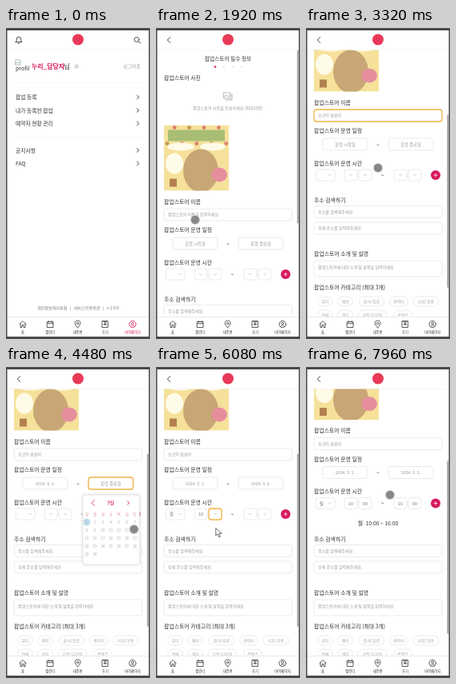
Recreate the animation shown at these times as an HTML page with a canvas. Size 180 by 389 pixels, loop 8 s.

```html
<!DOCTYPE html>
<html lang="ko">
<head>
<meta charset="utf-8">
<title>팝업 등록</title>
<style>
  html, body { margin: 0; width: 100%; height: 100%; overflow: hidden; background: #fff; }
  canvas { display: block; width: 180px; height: 389px; }
</style>
</head>
<body>
<canvas id="stage"></canvas>
<script>
const W = 180, H = 389, LOOP = 8000;
const INK = '#333', GREY = '#999', LINE = '#dedede', PINK = '#d81b60', GOLD = '#efb243';
const canvas = document.getElementById('stage');
const ctx = canvas.getContext('2d');
const ratio = window.devicePixelRatio || 1;
canvas.width = W * ratio;
canvas.height = H * ratio;

const OPEN_FORM = 860, ADD_PHOTO = 1500, SCROLL_START = 2800, SCROLL_END = 3240, ADD_TIME = 7720;
const NAME = '포근이 솜솜이';

// Which field has the focus, and from when to when.
const focusSpans = [
  ['name', 2040, 3600], ['startDate', 3600, 4000], ['endDate', 4240, 4680],
  ['day', 4920, 5080], ['startHour', 5200, 5840], ['startMinute', 5840, 6480],
  ['endHour', 6640, 7120], ['endMinute', 7120, 7560]
];

// time, x, y of the pointer
const path = [
  [80, 80, 150], [500, 34, 88], [860, 34, 88], [1120, 90, 86], [1400, 90, 86],
  [1920, 49, 240], [2600, 49, 240], [3320, 90, 175], [3560, 50, 146], [3700, 50, 146],
  [3960, 34, 192], [4200, 130, 146], [4300, 130, 146], [4480, 160, 203], [4640, 141, 194],
  [4900, 24, 184], [5060, 24, 184], [5280, 54, 190], [5700, 58, 232], [5900, 74, 186],
  [6320, 76, 226], [6640, 118, 184], [6880, 122, 234], [7100, 122, 234], [7280, 137, 185],
  [7480, 140, 220], [7660, 162, 184], [7760, 162, 184], [7960, 105, 160]
];

const clamp = v => Math.max(0, Math.min(1, v));
const ease = v => v * v * (3 - 2 * v);
const progress = (t, a, b) => ease(clamp((t - a) / (b - a)));

function text(str, x, y, size = 5.1, color = GREY, align = 'left', weight = 400) {
  ctx.font = `${weight} ${size}px "Noto Sans CJK KR", "Noto Sans CJK", sans-serif`;
  ctx.fillStyle = color;
  ctx.textAlign = align;
  ctx.textBaseline = 'middle';
  ctx.fillText(str, x, y);
}
const centered = (str, x, y, size, color, weight) => text(str, x, y, size, color, 'center', weight);
const label = (str, y) => text(str, 10, y, 6.9, INK, 'left', 500);

function rect(x, y, w, h, color) {
  ctx.fillStyle = color;
  ctx.fillRect(x, y, w, h);
}
function ellipse(x, y, rx, ry, color) {
  ctx.beginPath();
  ctx.ellipse(x, y, rx, ry, 0, 0, Math.PI * 2);
  ctx.fillStyle = color;
  ctx.fill();
}
const disc = (x, y, r, color) => ellipse(x, y, r, r, color);

function box(x, y, w, h, focused = false, radius = 3) {
  ctx.beginPath();
  ctx.roundRect(x, y, w, h, radius);
  ctx.fillStyle = '#fff';
  ctx.fill();
  ctx.lineWidth = focused ? 1.3 : 0.6;
  ctx.strokeStyle = focused ? GOLD : LINE;
  ctx.stroke();
}
function icon(x, y, d, color = INK, width = 0.9) {
  ctx.save();
  ctx.translate(x, y);
  ctx.lineWidth = width;
  ctx.lineCap = ctx.lineJoin = 'round';
  ctx.strokeStyle = color;
  ctx.stroke(new Path2D(d));
  ctx.restore();
}

const ICONS = {
  bell: 'M-4 2.5H4L2.8 1V-1A2.8 2.8 0 0 0-2.8-1V1ZM-1 4.3H1',
  search: 'M2.4-.5A3 3 0 1 1-3.6-.5A3 3 0 1 1 2.4-.5M1.6 1.7L4 4.2',
  back: 'M1.7-3.5L-1.7 0L1.7 3.5',
  next: 'M-1.2-2.2L1.2 0L-1.2 2.2',
  down: 'M-1.4-.7L0 .7L1.4-.7',
  gear: 'M2.4 0A2.4 2.4 0 1 1-2.4 0A2.4 2.4 0 1 1 2.4 0M.8 0A.8.8 0 1 1-.8 0A.8.8 0 1 1 .8 0',
  photo: 'M-5-4H3V3H-5ZM5-2V5H-3M-5 1L-2-1L0 1L3-1',
  home: 'M-4 0L0-4L4 0M-3-1V4H-1V1H1V4H3V-1',
  calendar: 'M-3.7-3H3.7V4H-3.7ZM-3.7-.8H3.7M-2-4.2V-2.5M2-4.2V-2.5',
  pin: 'M0 4.5C-6-2-3-4.5 0-4.5S6-2 0 4.5M1.2-1A1.2 1.2 0 1 1-1.2-1A1.2 1.2 0 1 1 1.2-1',
  review: 'M-3.5-4H3.5V4H-3.5ZM0-2V1.5M-1.7 0H1.7M-1.5-4V-2.5H1.5V-4',
  person: 'M4.2 0A4.2 4.2 0 1 1-4.2 0A4.2 4.2 0 1 1 4.2 0M1.4-1A1.4 1.4 0 1 1-1.4-1A1.4 1.4 0 1 1 1.4-1M-2.7 3C-1.5 1 1.5 1 2.7 3'
};

function drawHeader(isForm) {
  rect(0, 0, W, 27, '#fff');
  rect(0, 27, W, 0.5, '#eee');
  icon(16, 15, isForm ? ICONS.back : ICONS.bell);
  if (!isForm) icon(164, 15, ICONS.search);
  disc(90, 14.5, 7, '#e83a58');
}

function drawNav(isForm) {
  const tabs = [['home', '홈'], ['calendar', '캘린더'], ['pin', '내주변'], ['review', '후기'], ['person', '마이페이지']];
  rect(0, 361, W, 28, '#fff');
  rect(0, 361, W, 0.6, '#ddd');
  tabs.forEach(([name, title], i) => {
    const x = 21 + i * 34.3;
    const color = !isForm && i === 4 ? PINK : INK;
    icon(x, 370.5, ICONS[name], color, 0.8);
    centered(title, x, 380, 4.3, color);
  });
}

function drawMenu() {
  icon(15, 43, 'M-3-3H2L3-2V3H-3ZM-3 2L-1 0L1 1L3-1', '#8a9', 0.7);
  ctx.save();
  ctx.beginPath();
  ctx.rect(11, 38, 18, 18);
  ctx.clip();
  text('profile', 12, 50, 7, INK);
  ctx.restore();
  text('누리_담당자', 32, 48, 8, PINK, 'left', 700);
  text('님', 72.5, 48, 8, INK);
  icon(88, 48, ICONS.gear, '#aaa', 0.6);
  text('로그아웃', 168, 48, 5.8, GREY, 'right');
  rect(10, 68, 160, 0.5, '#eee');
  rect(10, 136, 160, 0.5, '#eee');
  [['팝업 등록', 86.5], ['내가 등록한 팝업', 103], ['예약자 현황 관리', 119.5], ['공지사항', 153], ['FAQ', 169.5]]
    .forEach(([title, y]) => {
      text(title, 12, y, 6.8, INK);
      icon(165, y, ICONS.next);
    });
  centered('개인정보처리방침   |   서비스이용약관   |   v.1.0.0', 90, 350, 5.1, '#777');
}

function drawPoster(x, y) {
  ctx.save();
  ctx.translate(x, y);
  ctx.beginPath();
  ctx.rect(0, 0, 81, 82);
  ctx.clip();
  rect(0, 0, 81, 82, '#f5e19a');
  rect(5, 6, 71, 14, '#a9bd75');
  for (let i = 0; i < 9; i++) disc(4 + i * 9.2, i % 2 ? 3 : 23, 2.4, i % 3 ? '#dd8271' : '#c99a4e');
  ellipse(21, 27, 17, 5, '#fffbe9');
  ellipse(61, 27, 16, 5, '#fffbe9');
  ellipse(13, 48, 11, 13, '#fffbe9');
  ellipse(46, 57, 22, 27, '#c8a675');
  ellipse(69, 62, 10, 9, '#e58f9d');
  rect(7, 67, 9, 10, '#b38150');
  ctx.restore();
}

function drawCalendar(x, y, selected) {
  ctx.save();
  ctx.shadowColor = '#0002';
  ctx.shadowBlur = 4 * ratio;
  box(x, y, 71, 87);
  ctx.restore();
  icon(x + 13, y + 10, ICONS.back, PINK, 0.8);
  centered('9월', x + 35, y + 10, 6.2, PINK, 500);
  icon(x + 57, y + 10, ICONS.next, PINK, 0.8);
  [...'일월화수목금토'].forEach((day, i) => centered(day, x + 5 + i * 10, y + 24, 4.5, '#d98aa3'));
  if (selected) disc(x + 5 + (selected - 1) * 10, y + 34, 4.5, '#bcdcec');
  for (let d = 0; d < 30; d++)
    centered(d + 1, x + 5 + d % 7 * 10, y + 34 + Math.floor(d / 7) * 10, 4.5, '#aaa');
}

function drawTimeRow(t, y, focus) {
  const select = (name, x, w, value) => {
    box(x, y - 7, w, 14, focus === name);
    if (value) centered(value, x + w / 2, y, 5.3, '#777');
    else icon(x + w / 2, y, ICONS.down, '#aaa', 0.6);
  };
  box(12, y - 7, 24, 14, focus === 'day');
  if (t >= 5080) text('월', 17, y, 5.3, '#777');
  icon(30, y, ICONS.down, '#aaa', 0.6);
  select('startHour', 48, 16, t >= 5840 && '10');
  select('startMinute', 66, 16, t >= 6480 && '00');
  centered('~', 95.5, y, 7, INK);
  select('endHour', 110, 16, t >= 7120 && '16');
  select('endMinute', 128, 16, t >= 7560 && '00');
  [65, 127].forEach(x => centered(':', x, y, 5, '#777'));
  disc(162, y, 6, PINK);
  icon(162, y, 'M-1.8 0H1.8M0-1.8V1.8', '#fff', 0.8);
}

function drawForm(t) {
  const focus = (focusSpans.find(([, from, to]) => t >= from && t < to) || [])[0];
  const added = t >= ADD_TIME ? 13.5 : 0;
  const scroll = 124 * progress(t, SCROLL_START, SCROLL_END) + added;

  ctx.save();
  ctx.translate(0, -scroll);
  centered('팝업스토어 필수 정보', 90, 38, 6.7, INK, 500);
  [74, 85, 96, 107].forEach((x, i) => disc(x, 48.5, i ? 0.9 : 1.3, i ? '#ddd' : PINK));
  label('팝업스토어 사진', 62);
  icon(90, 85, ICONS.photo, GREY, 0.7);
  centered('팝업스토어 사진을 등록하세요 (최대10장)', 90, 100, 5.1, GREY);
  if (t >= ADD_PHOTO) drawPoster(10, 121.5);
  else ctx.translate(0, -92);

  label('팝업스토어 이름', 217);
  box(10, 226, 160, 15, focus === 'name');
  const typed = NAME.slice(0, Math.floor(clamp((t - 2120) / 640) * NAME.length));
  text(typed || '팝업스토어 이름을 입력하세요.', 15, 233.5);

  label('팝업스토어 운영 일정', 252.5);
  box(21, 262, 56, 15, focus === 'startDate');
  box(103, 262, 56, 15, focus === 'endDate');
  centered(t < 4000 ? '운영 시작일' : '2024. 9. 1.', 49, 269.5, 5.3, GREY);
  centered(t < 4680 ? '운영 종료일' : '2024. 9. 5.', 131, 269.5, 5.3, GREY);
  centered('~', 90, 270, 7, INK);

  label('팝업스토어 운영 시간', 293);
  drawTimeRow(t, 308, focus);
  if (added) centered('월: 10:00 ~ 16:00', 90, 333, 6.8, INK, 500);

  ctx.save();
  ctx.translate(0, added);
  label('주소 검색하기', 339.5);
  box(10, 346.5, 160, 15);
  text('주소를 검색해주세요.', 15, 354);
  box(10, 367, 160, 15);
  text('상세 주소를 입력해주세요.', 15, 374.5);
  label('팝업스토어 소개 및 설명', 406);
  box(10, 415, 160, 20);
  text('팝업스토어에 대한 소개 및 설명을 입력하세요', 15, 423);
  label('팝업스토어 카테고리 (최대 3개)', 448);
  const chips = [
    ['뷰티', 24, 466], ['패션', 49, 466], ['음식/음료', 82, 466], ['캐릭터', 116, 466], ['리빙/공용', 150, 466],
    ['연예', 24, 483], ['게임', 49, 483], ['가전/디지털', 83, 483], ['콘텐츠', 121, 483]
  ];
  chips.forEach(([title, x, y]) => {
    const w = 10 + title.length * 4.3;
    box(x - w / 2, y - 6, w, 12, false, 6);
    centered(title, x, y, 5, '#aaa');
  });
  ctx.restore();

  if (focus === 'startDate') drawCalendar(14, 284, 0);
  if (focus === 'endDate') drawCalendar(96, 284, 1);
  ctx.restore();
  rect(176.5, 28 + scroll * 0.65, 1.5, 216, '#999');
}

function drawPointer(t) {
  if (t < path[0][0]) return;
  const i = path.findIndex(key => key[0] > t);
  const b = i < 0 ? path[path.length - 1] : path[i];
  const a = i < 0 ? b : path[i - 1];
  const p = a === b ? 0 : progress(t, a[0], b[0]);
  const x = a[1] + (b[1] - a[1]) * p;
  const y = a[2] + (b[2] - a[2]) * p;
  if (t >= 5100 && t < 7200) {
    ctx.fillStyle = '#fff';
    ctx.save();
    ctx.translate(x, y);
    ctx.fill(new Path2D('M0 0V9L2.2 7L4 11L5.6 10.2L3.9 6.4H7Z'));
    ctx.restore();
    icon(x, y, 'M0 0V9L2.2 7L4 11L5.6 10.2L3.9 6.4H7Z', '#444', 0.8);
  } else {
    disc(x, y, 6, '#7776');
    disc(x, y, 5, '#777c');
  }
}

function draw(t) {
  const isForm = t >= OPEN_FORM;
  ctx.setTransform(ratio, 0, 0, ratio, 0, 0);
  rect(0, 0, W, H, '#fff');
  if (isForm) drawForm(t);
  else drawMenu();
  drawHeader(isForm);
  drawNav(isForm);
  drawPointer(t);
  // Device frame
  rect(0, 0, W, 3, '#4a484b');
  rect(0, 386, W, 3, '#4a484b');
  rect(0, 0, 1.5, H, '#4a484b');
  rect(178.5, 0, 1.5, H, '#4a484b');
}

const start = performance.now();
function tick() {
  draw((performance.now() - start) % LOOP);
  requestAnimationFrame(tick);
}
tick();
</script>
</body>
</html>
```
